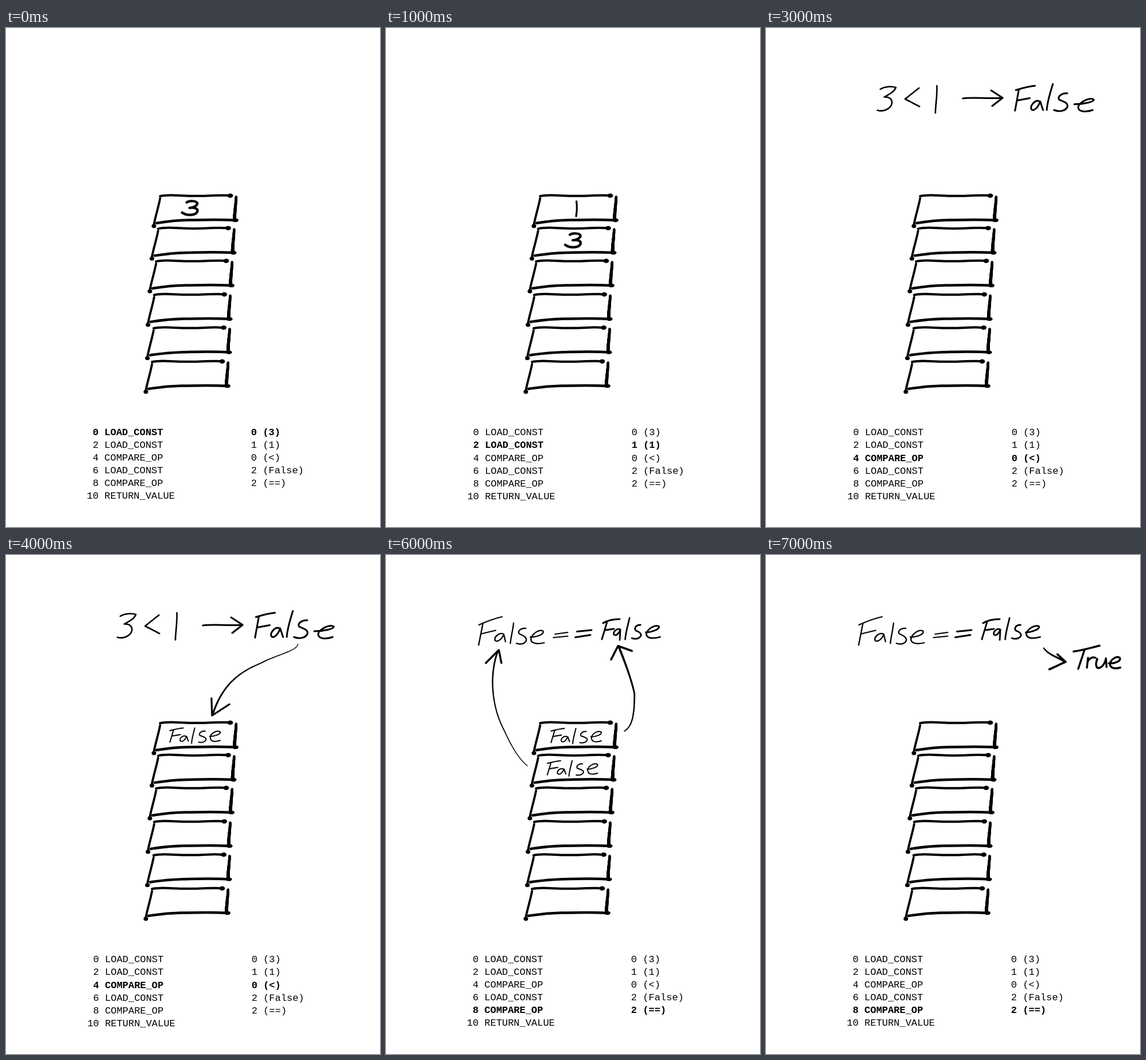
These frames come from a looping animation (648 by 864 pixels, 8 s). An HTML page:

```html
<!DOCTYPE html>
<html lang="en">
<head>
<meta charset="utf-8">
<title>Bytecode stack</title>
<style>
  html, body { margin: 0; width: 100%; height: 100%; overflow: hidden; background: #fff; }
  svg { display: block; width: 100vw; height: 100vh; }
  path { fill: none; stroke: #000; stroke-linecap: round; stroke-linejoin: round; }
  text { fill: #000; font-variant-ligatures: none; }
</style>
</head>
<body>
<svg id="stage" viewBox="0 0 648 864"></svg>
<script>
const STEP = 1000, STEPS = 8;
const NS = 'http://www.w3.org/2000/svg';
const stage = document.getElementById('stage');

function add(tag, attrs, parent = stage) {
  const el = document.createElementNS(NS, tag);
  for (const k in attrs) el.setAttribute(k, attrs[k]);
  return parent.appendChild(el);
}
const group = (x = 0, y = 0) => add('g', { transform: `translate(${x} ${y})` });
const ink = (g, width, d) => add('path', { d, 'stroke-width': width }, g);
const blob = (g, cx, cy, rx, ry) => add('ellipse', { cx, cy, rx, ry }, g);

// Pen stroke whose width grows from w0 to w1.
function taper(g, w0, w1, d) {
  const guide = ink(g, 0, d), len = guide.getTotalLength(), n = 50;
  const at = i => {
    const p = guide.getPointAtLength(len * i / n);
    return p.x.toFixed(2) + ',' + p.y.toFixed(2);
  };
  for (let i = 0; i < n; i++)
    ink(g, (w0 + (w1 - w0) * i / n).toFixed(2), `M${at(i)}L${at(i + 1)}`);
  guide.remove();
}

// Parts that are visible from one step to another, both included.
const parts = [];
function show(from, to, x, y, draw) {
  const g = group(x, y);
  draw(g);
  parts.push({ g, from, to });
}

// The stack
[[0, 0], [-3.5, 56.3], [-7, 113], [-10.3, 171], [-11.3, 228.7], [-14, 287]].forEach(([x, y]) => {
  const g = group(x, y);
  ink(g, 4, 'M267,291.3C279,288 292,289.5 306,290.3S340,291 360,290S378,290.3 389,290');
  blob(g, 388.5, 290.2, 4.8, 3.8);
  ink(g, 3.8, 'M267,295C264.5,309 258,329 256,342');
  blob(g, 256.3, 343, 4, 3.4);
  ink(g, 4.5, 'M261,337.8C285,334 300,333 318,332.6S365,331 396,332.7');
  taper(g, 4.4, 5.8, 'M398.8,292.5C398.3,305 396.3,316 396,332');
  blob(g, 397.5, 332.8, 5.4, 3.3);
});

// Handwriting
const three = g => ink(g, 4.2,
  'M313,302C318,298.5 330,299 331.5,303.5C331.5,308 324,311 318,311.5C327,310 333.5,313 331.5,318C328,325.5 312,325 305,319.5');
const one = g => ink(g, 3.2, 'M330,300Q331.5,312 329.5,326');
const smallFalse = g => ink(g, 2,
  'M284,304C292,302 300,300 307,299.5M290,304L284,324M287,313.5L302,311' +
  'M312,314C306,311 300,318 302,322C306,325 311,319 313,314L316,322.5' +
  'M327,299.5C325,308 322,318 321.5,326' +
  'M345,305C339,304 333,309 336,312.5C342,314.5 349,317 346,321C343,325 337,325 334,324' +
  'M353,314C361,314.5 373,310 371,306C365,302.5 354,309 354,316C354,323.5 363,324 371,321');

show(0, 0, 0, 0, three);
show(1, 2, 5.5, 56, three);
show(1, 2, 0, 0, one);

show(2, 4, 0, 0, g => ink(g, 2.6,
  'M198,106C206,101 217,100.5 225,103C222,111 213,115 205,119.5C215,119 221,125 217,134C212,142 202,145 193,142.5' +
  'M265,104L241,123L266,136M296,100C297,115 294,130 293.5,147'));

show(2, 2, 0, 0, g => {
  taper(g, 1.3, 3.2, 'M237,369C222,347 206,320 196,281C184,235 179,200 196,155');
  ink(g, 4.2, 'M181,169C184,163 191,161 197,153.5L199.5,172');
  taper(g, 1.2, 3.2, 'M407,308C418,300 418,282 404,258C385,229 340,195 306,159');
  ink(g, 4.2, 'M304,177L306,157.5L321,159.5');
});

show(3, 4, 0, 0, g => ink(g, 3,
  'M341,122C360,119 385,123 408,121M390,108L410,121L392,135' +
  'M433,107.5C444,104 455,101 466,100M438,107L431.5,143M435,125.5L457,121.5' +
  'M474,127C466,123 457,135 460,141C464,145 472,137 475,127L480,142' +
  'M497,97C492,113 487,129 486.5,142' +
  'M522,113C513,112 504,119 508,124C515,127 525,130 522,137C518,145 506,145 499,142' +
  'M534,132C550,132 568,128 568,124C561,119 544,128 541,136C540,146 555,146 566,142'));

show(4, 4, 0, 0, g => {
  smallFalse(g);
  taper(g, 1.2, 3.2, 'M506,154C505,166 470,172 440,188C395,206 372,234 358,276');
  ink(g, 3.2, 'M356,248L357,278L387,258.5');
});

show(5, 6, 2, .7, smallFalse);
show(5, 6, -4.5, 56.7, smallFalse);

show(6, 7, 0, 0, g => {
  ink(g, 2.3,
    'M161,121C172,116 187,110 201,107M168,118L160.5,156M165,136.5L190,130.5' +
    'M204,137C196,133 187,142 189,148C194,152 202,144 204,137L207,150' +
    'M221,118C220,130 216,143 215.5,153' +
    'M242,127C234,126 227,132 231,136.5C238,139 246,144 242,150C238,155 231,154.5 226,153' +
    'M250,142C262,142.5 275,137 272,131.5C264,128 252,138 251,146C252,155 266,154 274,152');
  ink(g, 2.2, 'M293,137L315,134M290,143L315,140.5');
  ink(g, 3.2, 'M331,132.5L356,130M328,142.5L354,138.5');
  ink(g, 2.8,
    'M376,118C385,112.5 395,111 405,111M383,116L374,146M380,130L395,128' +
    'M406,129C400,126 393,133 395,138C399,141 404,135 406,129L405,147' +
    'M422,109C419,122 415,135 414.5,146' +
    'M441,121C432,121 429,128 434,131.5C443,134.5 444,140 438,143.5C434,146 430,145.5 426,144' +
    'M450,134C462,133.5 475,128 473,123.5C465,120 452,129 451,137C452,146 465,144.5 475,142');
});

show(6, 6, 0, 0, g => {
  taper(g, 1.2, 2.8, 'M245,365C225,349 212,319 202,298C184,262 178,208 194,166');
  ink(g, 3.4, 'M173,187L195.5,164.5L200,187');
  taper(g, 1.8, 3.8, 'M413,305C424,298 428,286 430,262L430.5,240C425,215 415,188 403,158');
  ink(g, 3.6, 'M390,181L402,157.5L426,166');
});

show(7, 7, 0, 0, g => {
  taper(g, 2, 3.4, 'M481,161C490,173 503,176 519,185');
  ink(g, 3.6, 'M505,172L519,185L491,198');
  ink(g, 3.4,
    'M533,167C550,165 564,160 578,157M552,164L541,197' +
    'M558,178L556,195M557,185C561,178 566,176 571,178' +
    'M574,180C570,190 572,197 578,195.5C584,193 588,186 589,179L590,194' +
    'M594,187.5C605,188.5 616,183 613,178C606,174 596,182 596,190C598,198 608,196.5 614,195');
});

// The listing: size is chosen so that one character advances by ADV.
const ADV = 10.16, LEFT = 140.1, BASE = 704.6, LEADING = 22.13;
const FONT = '"Source Code Pro", "Liberation Mono", monospace';
const ctx = document.createElement('canvas').getContext('2d');
ctx.font = '100px ' + FONT;
const listing = group();
listing.style.fontFamily = FONT;
listing.style.fontSize = 100 * ADV / ctx.measureText('0').width + 'px';

const rows = [
  ['0', 'LOAD_CONST', '0 (3)'],
  ['2', 'LOAD_CONST', '1 (1)'],
  ['4', 'COMPARE_OP', '0 (<)'],
  ['6', 'LOAD_CONST', '2 (False)'],
  ['8', 'COMPARE_OP', '2 (==)'],
  ['10', 'RETURN_VALUE', '']
].map((cells, i) => {
  const row = add('text', { y: BASE + LEADING * i }, listing);
  const cols = [2 - cells[0].length, 3, 28];
  cells.forEach((s, c) => {
    add('tspan', { x: LEFT + ADV * cols[c] }, row).textContent = s;
  });
  return row;
});

const activeRow = [0, 1, 2, 2, 2, 3, 4, 4];
let current = -1;

function render(step) {
  for (const { g, from, to } of parts)
    g.style.display = step >= from && step <= to ? '' : 'none';
  rows.forEach((r, i) => { r.style.fontWeight = i === activeRow[step] ? 700 : 400; });
  const nudged = step >= 1 && step <= 5;
  listing.setAttribute('transform', nudged ? 'translate(.8 .7)' : 'translate(0 0)');
}

const start = performance.now();
function tick() {
  const step = Math.floor((performance.now() - start) / STEP) % STEPS;
  if (step !== current) render(current = step);
  requestAnimationFrame(tick);
}
tick();
</script>
</body>
</html>
```
